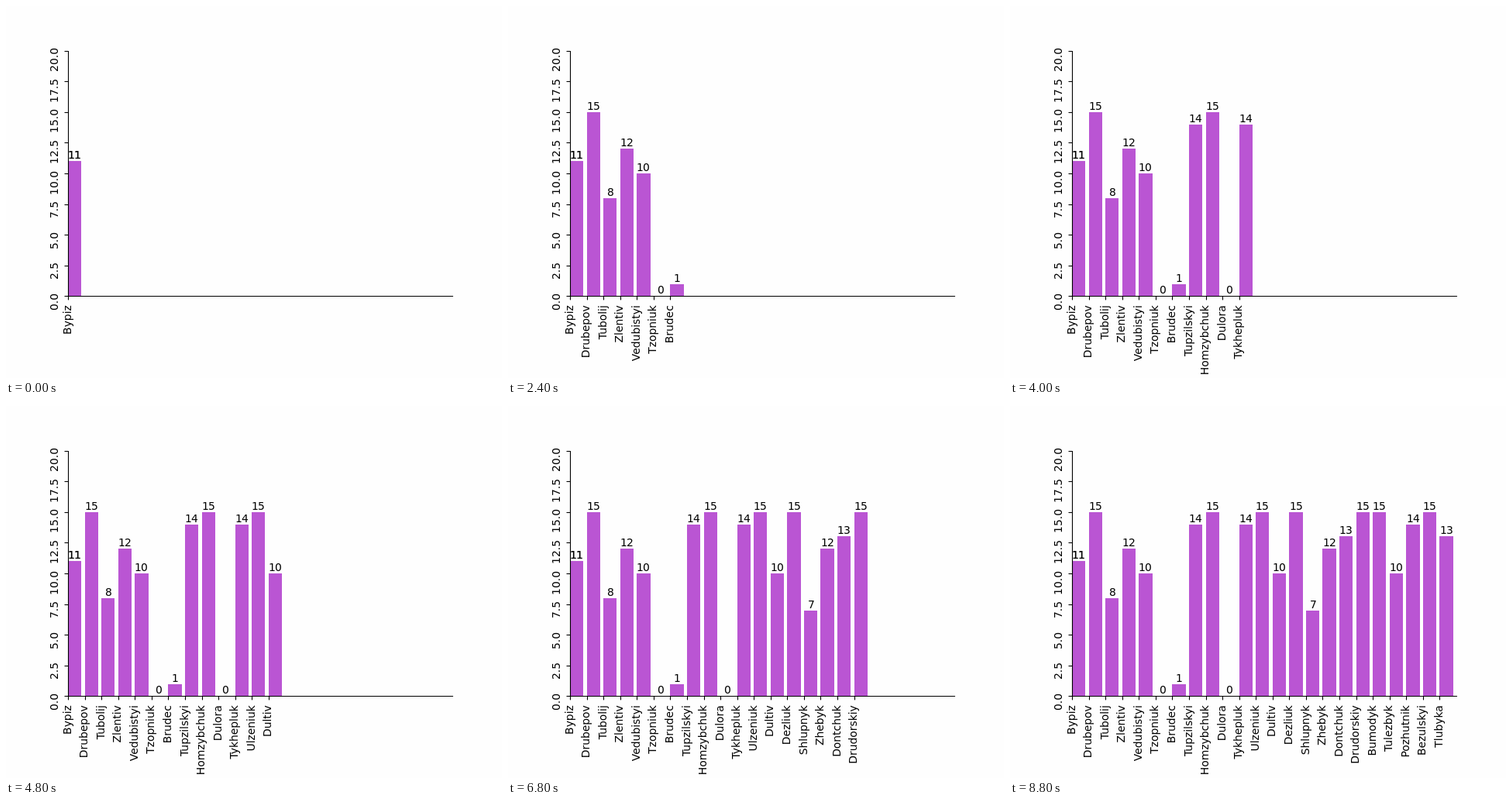
An HTML page that plays this animation: 640x480 px, repeating every 9200 ms.

```html
<!DOCTYPE html>
<html lang="en">
<head>
<meta charset="utf-8">
<title>Bar chart</title>
<style>
  html, body { margin: 0; width: 100%; height: 100%; overflow: hidden; background: #fefefe; }
  svg { display: block; width: 640px; height: 480px; }
  text { font: 13.89px "DejaVu Sans", sans-serif; }
  .value { letter-spacing: -0.84px; }
  .bar { fill: #ba55d3; }
  .axis { stroke: #000; stroke-width: 1.11; fill: none; }
</style>
</head>
<body>
<svg viewBox="0 0 640 480"></svg>
<script>
const STEP_MS = 400;
const LEFT = 80, RIGHT = 576, TOP = 57.6, BOTTOM = 374.4, MAX = 20;
const data = [
  ["Bypiz", 11], ["Drubepov", 15], ["Tubolij", 8], ["Zlentiv", 12],
  ["Vedubistyi", 10], ["Tzopniuk", 0], ["Brudec", 1], ["Tupzilskyi", 14],
  ["Homzybchuk", 15], ["Dulora", 0], ["Tykhepluk", 14], ["Ulzeniuk", 15],
  ["Dultiv", 10], ["Dezliuk", 15], ["Shlupnyk", 7], ["Zhebyk", 12],
  ["Dontchuk", 13], ["Drudorskiy", 15], ["Bumodyk", 15], ["Tulezbyk", 10],
  ["Pozhutnik", 14], ["Bezulskyi", 15], ["Tlubyka", 13]
];
const svg = document.querySelector("svg");
const slot = (RIGHT - LEFT) / data.length;
const yOf = v => BOTTOM - v * (BOTTOM - TOP) / MAX;

function add(parent, tag, attrs, text = "") {
  const el = document.createElementNS("http://www.w3.org/2000/svg", tag);
  for (const key in attrs) el.setAttribute(key, attrs[key]);
  el.textContent = text;
  return parent.appendChild(el);
}

const line = (parent, d) => add(parent, "path", { class: "axis", d });

// Text reading upwards, with its end at (x, y)
const upText = (parent, x, y, text) => add(parent, "text",
  { transform: `translate(${x} ${y}) rotate(-90)`, "text-anchor": "end" }, text);

const bars = data.map(([name, value], i) => {
  const group = add(svg, "g", {});
  const x = LEFT + i * slot, width = slot * 0.8;
  const x0 = Math.round(x), y0 = Math.round(yOf(value));
  add(group, "rect", {
    class: "bar", x: x0, y: y0,
    width: Math.round(x + width) - x0, height: Math.round(BOTTOM) - y0
  });
  // Values start on whole pixels; the first is printed twice, so it looks bolder
  const textX = Math.round(x + width / 2 - 4.65 * String(value).length + 0.9);
  for (let n = i ? 1 : 2; n > 0; n--) {
    add(group, "text", { class: "value", x: textX, y: Math.round(yOf(value) - 3) }, value);
  }
  line(group, `M${x0 + 0.5} 374.5V379.4`);
  upText(group, Math.round(x + 3.6), 386.2, name);
  return group;
});

line(svg, "M80.5 57.9V375M80 374.5H577");
for (let v = 0; v <= MAX; v += 2.5) {
  line(svg, `M75.5 ${Math.round(yOf(v)) + 0.5}H80.5`);
  upText(svg, 67, Math.round(yOf(v) - 3.5), v.toFixed(1));
}

const start = performance.now();
function draw(now) {
  const last = Math.floor(Math.max(0, now - start) / STEP_MS) % data.length;
  bars.forEach((bar, i) => bar.setAttribute("visibility", i <= last ? "visible" : "hidden"));
  requestAnimationFrame(draw);
}
draw(start);
</script>
</body>
</html>
```
